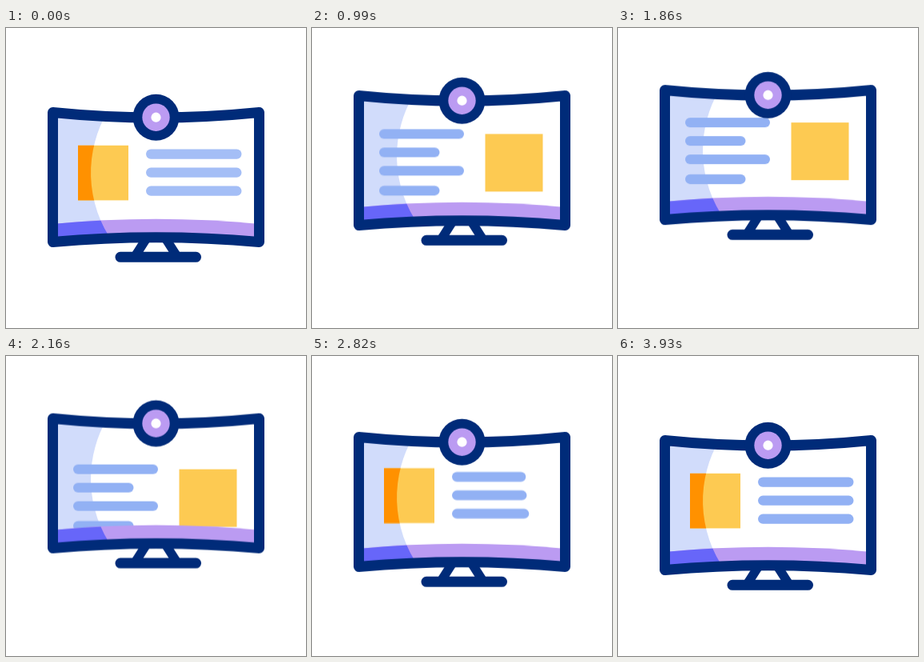
Animation of 375x375 px, one loop 4740 ms. Source, as an HTML page:

```html
<!DOCTYPE html>
<html lang="en">
<head>
<meta charset="utf-8">
<title>Curved monitor</title>
<style>
  html, body { margin: 0; width: 100%; height: 100%; overflow: hidden; background: #fff; }
  svg { display: block; width: 100%; height: 100%; }

  .bob, .scroll, .lines, .shade, .grow { animation: 4740ms infinite ease-in-out; }
  .bob { animation-name: bob; }
  .scroll { animation-name: scroll; }
  .lines { animation-name: ink; animation-timing-function: step-end; }
  .shade { fill: #d1dcfb; animation-name: shade; animation-timing-function: step-end; }
  .grow { animation-name: grow; animation-delay: var(--lag, 0ms); }

  .lines { fill: #92b1f4; }
  .frame { fill: none; stroke: #002b79; stroke-width: 13; stroke-linecap: round; stroke-linejoin: round; }
  .legs { stroke-width: 11.5; }

  /* whole monitor: dip, lift, drift, drop, rebound */
  @keyframes bob {
    0%, 6.96% { transform: translateY(0); }
    10.97% { transform: translateY(11px); }
    22.36% { transform: translateY(-22px); animation-timing-function: linear; }
    39.66%, 44.68% { transform: translateY(-28px); }
    55.23% { transform: translateY(11px); }
    62.45% { transform: translateY(-12px); }
    71.52%, 100% { transform: translateY(0); }
  }
  /* page content: second section is 170px below the first */
  @keyframes scroll {
    0%, 6.96% { transform: translateY(0); }
    11.81% { transform: translateY(6px); }
    23.21% { transform: translateY(-178px); }
    39.24%, 43.25% { transform: translateY(-170px); }
    52.53% { transform: translateY(4px); }
    61.18% { transform: translateY(-3px); }
    69.62%, 100% { transform: translateY(0); }
  }
  @keyframes grow {
    0%, 53.16% { width: 119.5px; }
    60.76% { width: 92px; }
    67.3% { width: 125.3px; }
    72.57% { width: 118.5px; }
    81.22%, 100% { width: 119.5px; }
  }
  @keyframes ink {
    0% { fill: #a4bef6; }
    6.96%, 100% { fill: #92b1f4; }
  }
  @keyframes shade {
    0% { fill: #d1dcfb; }
    66.46% { fill: #dac8f8; }
    69.62%, 100% { fill: #d1dcfb; }
  }
</style>
</head>
<body>
<svg viewBox="0 0 375 375">
  <defs>
    <path id="bezel" d="M58.5 105.5Q187.5 118.5 316.5 105.5V267.5Q187.5 256 58.5 267.5Z"/>
    <path id="gloss" d="M58 100H129.8A150 150 0 0 0 135.3 270H58Z"/>
    <path id="band" d="M58 245Q187.5 232.5 317 245V270H58Z"/>
    <rect id="card" x="90" y="146.8" width="63" height="68.6"/>
    <clipPath id="screen"><use href="#bezel"/></clipPath>
    <clipPath id="glossClip"><use href="#gloss"/></clipPath>
  </defs>

  <g class="bob">
    <g clip-path="url(#screen)">
      <use href="#gloss" class="shade"/>
      <g class="scroll">
        <use href="#card" fill="#fdca52"/>
        <g class="lines">
          <rect class="grow" style="--lag:-80ms" x="175" y="151.5" width="119.5" height="12.2" rx="6.1"/>
          <rect class="grow" x="175" y="174.6" width="119.5" height="12.2" rx="6.1"/>
          <rect class="grow" style="--lag:-4700ms" x="175" y="197.6" width="119.5" height="12.2" rx="6.1"/>
        </g>
        <g transform="translate(0 170)">
          <rect x="216.5" y="146" width="72" height="72" fill="#fdca52"/>
          <g class="lines">
            <rect x="84" y="139.9" width="106" height="12.2" rx="6.1"/>
            <rect x="84" y="162.9" width="75.5" height="12.2" rx="6.1"/>
            <rect x="84" y="185.9" width="106" height="12.2" rx="6.1"/>
            <rect x="84" y="210.7" width="75.5" height="12.2" rx="6.1"/>
          </g>
        </g>
      </g>
      <g clip-path="url(#glossClip)">
        <g class="scroll"><use href="#card" fill="#ff9100"/></g>
      </g>
      <use href="#band" fill="#bb9bf2"/>
      <use href="#band" fill="#6766f9" clip-path="url(#glossClip)"/>
    </g>

    <g class="frame">
      <path class="legs" d="M174.3 265L162.8 283M200.7 265L212.2 283"/>
      <path d="M143 286.3H237.5"/>
      <use href="#bezel"/>
    </g>
    <circle cx="187.5" cy="111.7" r="29" fill="#002b79"/>
    <circle cx="187.5" cy="111.7" r="17.2" fill="#bb9bf2"/>
    <circle cx="187.5" cy="111.7" r="6.1" fill="#fff"/>
  </g>
</svg>
</body>
</html>
```
